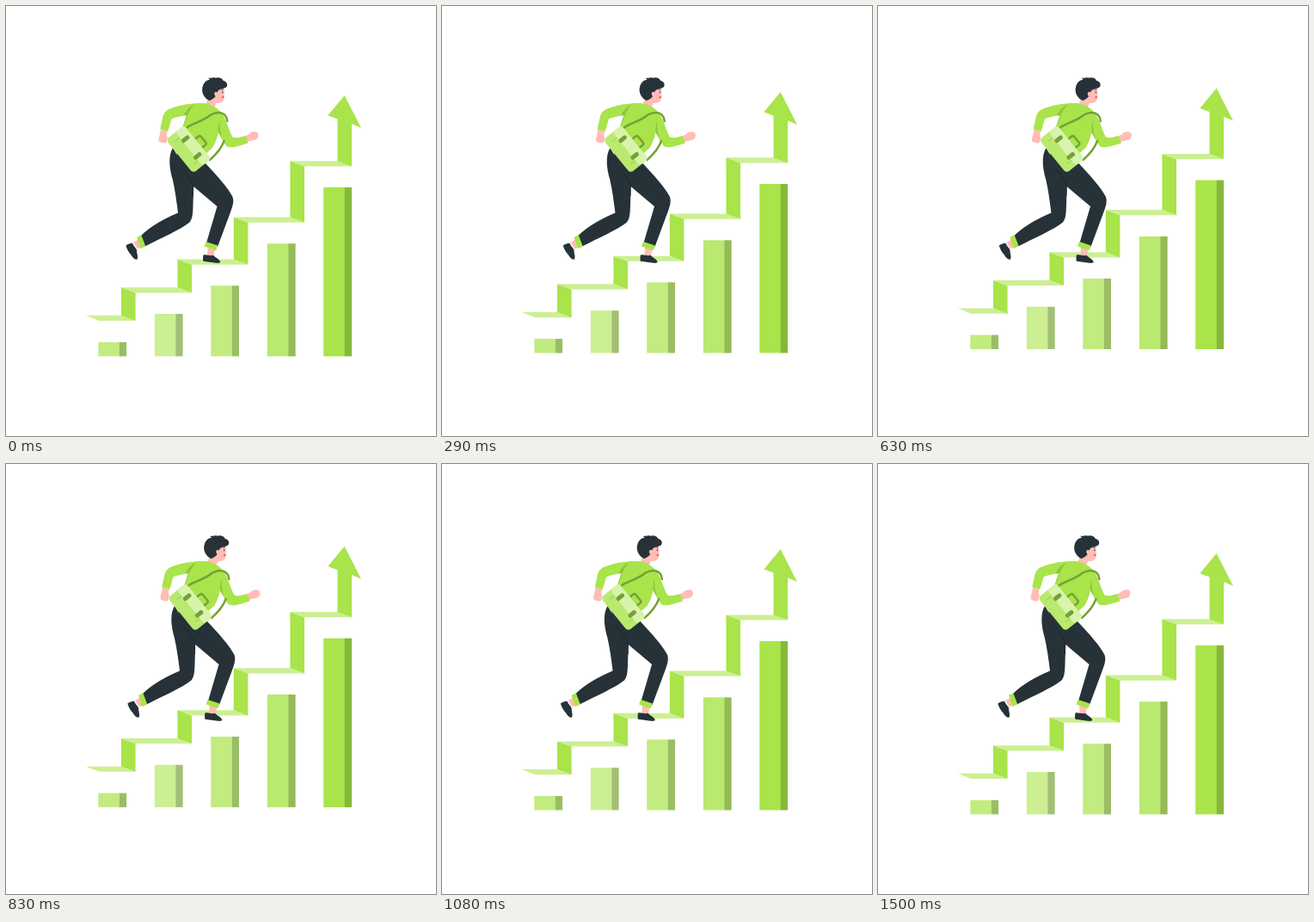
Recreate the animation shown at these times as an HTML page. Size 500 by 500 pixels, loop 1.54 s.

```html
<!DOCTYPE html>
<html lang="en">
<head>
<meta charset="utf-8">
<title>Climbing the chart</title>
<style>
  html, body { margin: 0; width: 100%; height: 100%; overflow: hidden; background: #fff; }
  svg { display: block; width: 100vw; height: 100vh; }
  .lime { fill: #a8e44a; }
  .pale { fill: #ccef93; }
  .ink { fill: #263238; }
  .skin { fill: #ffbdb5; }
  .strap { fill: none; stroke: #76a034; stroke-width: 2.4; stroke-linecap: round; }
</style>
</head>
<body>
<svg viewBox="0 0 500 500" xmlns="http://www.w3.org/2000/svg">
  <g id="chart">
    <g id="bars"></g>
    <g id="steps"></g>
    <path class="lime" d="M385.5 180.8V131.8L374.3 127.6 393.6 104.3 413 142.2 402 137.4V186.8Z"/>
  </g>
  <g id="runner">
    <!-- back foot -->
    <path class="skin" d="M148 275L154 271.500 160 279 153 282.500Z"/>
    <path class="ink" d="M139.300 278.500C141 277 145 276 147 275.800 148 279 151 281.500 152 283.500 152 288 154 291.500 152.500 294.500 149.500 295.500 147.500 292.500 145.500 289.500 143 287 140.500 283 139.300 278.500Z"/>
    <!-- front foot -->
    <path class="skin" d="M234.500 280L243 283 241 292H234Z"/>
    <path class="ink" d="M229.500 289.500C233 288.500 237 291 241 289.800 243 292.500 248 294 249.200 297.500 249 299 247 299 244 298.800L229.300 296.700C228.800 294 229 291 229.500 289.500Z"/>
    <!-- trousers -->
    <path class="ink" d="M194 165C188.500 174 189.700 188 193.800 202 196.500 214 198.500 228 200 240.500 185 246.500 168 256 156.500 267.500L161.500 279.500C180 270 203 260 213.500 251.500 217.500 247 217.300 238 217.600 228L218.300 206Z"/>
    <path class="ink" d="M198 166L232 183C245 197 258 211 263.500 222 265.500 228 263 234 260.500 241L246 280 233 275.500 245.500 233 217 209 200 185Z"/>
    <path d="M205 190C210 194 214 200 217.500 208V221" fill="none" stroke="#1b2529" stroke-width="1"/>
    <path class="lime" d="M152 269L157.200 266.200 162.200 279.300 156.500 282.200Z"/>
    <path class="lime" d="M232.500 274L246.200 278.600 244.300 284.300 230.500 279.600Z"/>
    <!-- hands -->
    <path class="skin" d="M180 143.500L187.500 146 186.700 150C188.500 153 187.700 157 185.500 159.500 182 160 179 158.500 177.300 156.500 177.600 153 179 150 180 143.500Z"/>
    <path class="skin" d="M277 151.500L282 149.500C284 146.500 288 145.800 291.500 146.800 294 148 293.800 151.500 292 154.500 288.500 156.500 284 156.500 279 158.500Z"/>
    <!-- neck and sweater -->
    <path class="skin" d="M236 106L245 111 242 119 232 114Z"/>
    <path class="lime" d="M233 113.500C222 112 204 114.300 192 119 186 121.200 183.500 124 182.300 129L179.200 143.200 188.200 146 192.500 131.200C198 129 204 128 210 127L205 142V165L232 172 240 165C243.500 159 246 152.500 247 147 250 153 253 159.500 257 163.500 263 166 273 162 281.500 159.500L278 151C272 153 266 154.200 263.200 152 259.500 145 257 135 253 128 249 121 243 116 233 113.500Z"/>
    <path d="M219 114.500C212 118 209 122 206.500 127.700L210 127 205.300 142C209 136 210 124 219 114.500Z" fill="#8fc43f"/>
    <path d="M247 147C246.700 142 247 137 249 133 247.800 139 249 145 251 154Z" fill="#8fc43f"/>
    <!-- head -->
    <path class="skin" d="M242 99L246 95.500 253 94.500C253.500 98 254.500 103 253.500 108 252.500 112 248.500 113.500 244.500 113L239 109Z"/>
    <path class="ink" d="M229 92.500C230.500 88 234 86 237 85.700L235.200 83.700C240 84 242 82.500 244 83.800 248 82.500 251.500 84 252.500 86.800 257 88 258.500 92 256 94.500 252 96.500 248 96 246 99.500 245 103 243.500 107.500 236.500 110 231 107.500 226 101 229 92.500Z"/>
    <ellipse class="skin" cx="244.500" cy="102.800" rx="2" ry="3" transform="rotate(-20 244.500 102.800)"/>
    <path d="M250 97.200L253 96.800" stroke="#263238" stroke-width=".8"/>
    <ellipse class="ink" cx="251.800" cy="100.300" rx=".6" ry="1"/>
    <path d="M251 106.500L253.300 105.500" stroke="#e84b4b" stroke-width="1.400"/>
    <!-- bag -->
    <path class="strap" d="M207 145C211 137 227 136 238 126.500 249 121 256.500 125 257.300 134"/>
    <path class="strap" d="M253.500 157C251 164 245 172 237 179"/>
    <g transform="translate(207 138.700) rotate(51)">
      <path class="strap" d="M20.500 0V-5Q20.500-7 22.500-7H31.500Q33.500-7 33.500-5V0"/>
      <rect width="50" height="27" rx="4.500" fill="#b9e96e"/>
      <path d="M4 0H46Q50 0 50 4V9Q50 13 46 13H4Q0 13 0 9V4Q0 0 4 0Z" fill="#d8f3ac"/>
      <path d="M8 13V20M42 13V20" stroke="#a0d252" stroke-width="1"/>
      <rect x="11" y="3.500" width="5" height="10.500" rx="2" fill="#76a034"/>
      <rect x="35" y="5" width="5" height="10.500" rx="2" fill="#76a034"/>
    </g>
  </g>
</svg>
<script>
const LOOP = 1540, FRAME = LOOP / 37, CYCLE = 1500, START = 0.018;
const $ = id => document.getElementById(id);
const poly = (pts, attr) => `<polygon points="${pts.join(' ')}" ${attr}/>`;

// bars: left, top, front colour
const BASE = 407.7;
$('bars').innerHTML = [
  [107.3, 391.2, '#c2ec7f'], [172.8, 358.4, '#ccef93'], [238.2, 325.6, '#c2ec7f'],
  [303.8, 276.6, '#b9e96e'], [369.2, 211.2, '#a8e44a']
].map(([x, y, fill]) =>
  `<rect x="${x}" y="${y}" width="32.8" height="${BASE - y}" fill="${fill}"/>
   <rect x="${x + 24.6}" y="${y}" width="8.2" height="${BASE - y}" fill-opacity=".2"/>`
).join('');

// treads: left, right, height; each riser joins a tread to the next one
const DX = 16.6, DY = 6.2;
const treads = [[93, 134, 360.2], [134, 199.4, 327.6], [199.4, 264.8, 294.9],
                [264.8, 330.4, 245.8], [330.4, 385.5, 180.6]];
$('steps').innerHTML = treads.map(([a, b, y], i) => {
  const tread = poly([a, y, b, y, b + DX, y + DY, a + (i ? DX : 15), y + DY], 'class="pale"');
  const next = treads[i + 1];
  if (!next) return tread;
  const top = next[2];
  return tread + poly([b, top, b + DX, top + DY, b + DX, y + DY, b, y], 'class="lime"');
}).join('');

// sideways shake, one value per tenth of the cycle
const SHAKE = [0, -1, 2, -4, 4, -4, 4, -4, 2, -1, 0];

function draw(now) {
  const tick = Math.floor(((now % LOOP) + 4) / FRAME) % 37;
  const phase = (tick * FRAME / CYCLE + START) % 1;
  const lift = 10 * (1 - Math.abs(2 * phase - 1));
  const i = Math.floor(phase * 10), f = phase * 10 - i;
  const shake = SHAKE[i] + (SHAKE[i + 1] - SHAKE[i]) * f;
  $('chart').setAttribute('transform', `translate(0 ${-lift.toFixed(3)})`);
  $('runner').setAttribute('transform', `translate(${(shake + 0.2).toFixed(3)} 0)`);
}

let begin;
function loop(now) {
  begin ??= now;
  draw(now - begin);
  requestAnimationFrame(loop);
}
draw(0);
requestAnimationFrame(loop);
</script>
</body>
</html>
```
